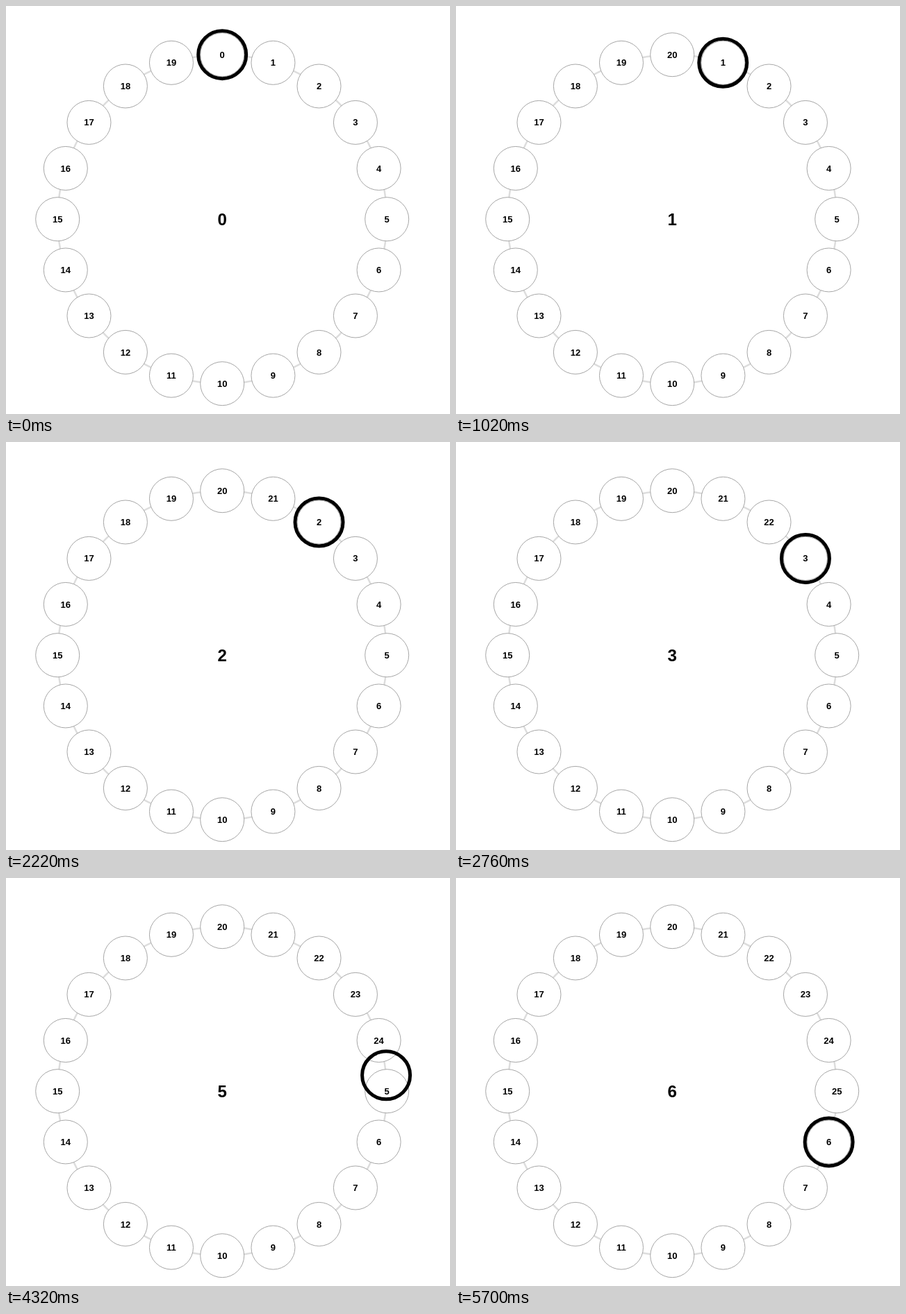
Animation, 639 px wide and 588 px high, one loop 5760 ms. Source, as an HTML page:

```html
<!DOCTYPE html>
<html lang="en">
<head>
<meta charset="utf-8">
<title>Ring counter</title>
<style>
  html, body { margin: 0; width: 100%; height: 100%; overflow: hidden; background: #fff; }
  svg { display: block; }
  text { font: bold 13px "Liberation Sans", Arial, sans-serif; text-anchor: middle; fill: #000; }
  #total { font-size: 24px; }
  .node { fill: #fff; stroke: #a6a6a6; }
  .link { fill: none; stroke: #ddd; stroke-width: 2.5; }
  #marker { fill: none; stroke: #000; stroke-width: 5; }
</style>
</head>
<body>
<svg width="639" height="588">
  <circle class="link" cx="311.2" cy="307.2" r="237"/>
  <g id="nodes"></g>
  <text id="total" x="311.2" y="316"></text>
  <circle id="marker" r="34.5"/>
</svg>
<script>
const LOOP = 5760, MOVE = 480, COUNT = 20;
const STARTS = [575, 1475, 2270, 3241, 4126, 5032];
const CX = 311.2, CY = 307.2, RADIUS = 237;
const nodes = document.getElementById('nodes');
const total = document.getElementById('total');
const marker = document.getElementById('marker');

function add(tag, attrs) {
  const el = document.createElementNS('http://www.w3.org/2000/svg', tag);
  for (const key in attrs) el.setAttribute(key, attrs[key]);
  return nodes.appendChild(el);
}

function place(step) {
  const a = step / COUNT * 2 * Math.PI;
  return [CX + RADIUS * Math.sin(a), CY - RADIUS * Math.cos(a)];
}

const labels = Array.from({ length: COUNT }, (_, i) => {
  const [x, y] = place(i);
  add('circle', { class: 'node', cx: x, cy: y, r: 31.5 });
  return add('text', { x, y: y + 4.6 });
});

const bezier = (u, a, b) => 3 * a * u * (1 - u) ** 2 + 3 * b * u * u * (1 - u) + u ** 3;

// The standard CSS "ease" curve, solved by bisection.
function ease(t) {
  if (t >= 1) return 1;
  let lo = 0, hi = 1;
  for (let i = 0; i < 24; i++) {
    const mid = (lo + hi) / 2;
    if (bezier(mid, 0.25, 0.25) < t) lo = mid; else hi = mid;
  }
  return bezier(lo, 0.1, 1);
}

function draw(time) {
  const count = STARTS.filter(s => s <= time).length;
  const step = count ? count - 1 + ease((time - STARTS[count - 1]) / MOVE) : 0;
  const [x, y] = place(step);
  marker.setAttribute('cx', x);
  marker.setAttribute('cy', y);
  total.textContent = count;
  labels.forEach((label, i) => label.textContent = i < count ? i + COUNT : i);
}

const origin = performance.now();
function tick() {
  draw((performance.now() - origin) % LOOP);
  requestAnimationFrame(tick);
}
tick();
</script>
</body>
</html>
```
